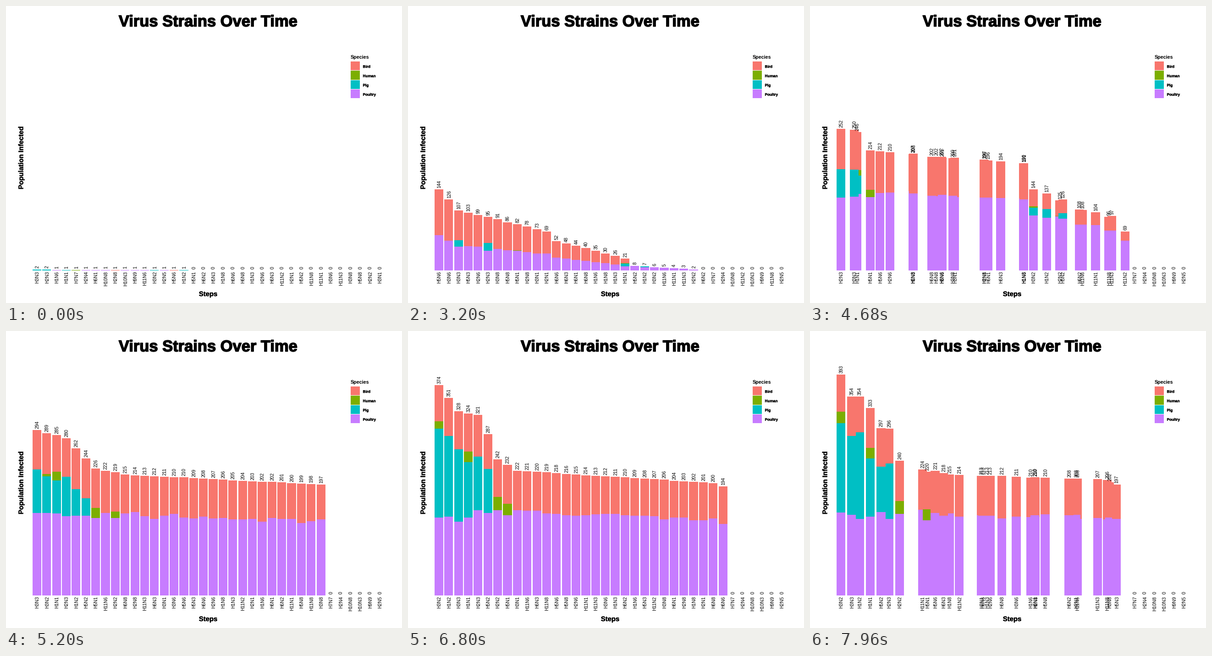
A matplotlib script for the animation above (8 s loop, 864 by 648 pixels).

```python
import numpy as np
import matplotlib.pyplot as plt
from matplotlib import patheffects
from matplotlib.animation import FuncAnimation
from matplotlib.collections import PolyCollection

W, H, DPI = 864, 648, 72
BASE, UNIT = 577, 1.2265            # baseline and pixels per infection
X0, PITCH, BAR = 67.4, 21.37, 19.2
STEPS, PER_STEP, HOLD = 20, 10, 5   # frames per step, frames held still

POULTRY, PIG, HUMAN, BIRD = range(4)
COLORS = ["#C77CFF", "#00BFC4", "#7CAE00", "#F8766D"]

# Listed in the order that settles ties.
STRAINS = (
    "H5N1 H1N6 H6N2 H5N3 H1N8 H1N1 H3N3 H2N3 H7N7 H2N4 H6N1 H10N8 "
    "H6N6 H2N8 H6N8 H1N3 H2N6 H6N3 H11N2 H10N3 H2N1 H9N9 H11N6 H3N2 "
    "H5N2 H11N8 H2N5 H11N1 H3N6 H11N3 H5N6 H3N8 H5N8 H1N2 H2N2 H3N1"
).split()
N = len(STRAINS)
ROW = {s: i for i, s in enumerate(STRAINS)}
rng = np.random.default_rng(5)

totals = np.zeros((STEPS + 1, N))
slots = np.zeros((STEPS + 1, N))
ranked_steps = []


def ranking(step, names, profile):
    """Rank the strains; totals follow a line through {rank: total}."""
    order = [ROW[s] for s in names.split()]
    ranks = np.arange(len(order))
    totals[step, order] = np.round(
        np.interp(ranks, list(profile), list(profile.values())))
    order += [i for i in range(N) if i not in order]
    slots[step, order] = np.arange(N)
    ranked_steps.append(step)


ranking(0, "H3N3 H2N3 H1N6 H1N1 H7N7 H2N4 H6N1 H10N8 H2N8 H10N3 H9N9 H11N6 "
           "H3N2 H2N5 H5N6 H1N2", {1: 2, 2: 1})
ranking(4, "H5N6 H2N3 H3N3 H1N6 H6N1 H2N8 H1N1 H2N6 H5N3 H11N6 H3N6 H1N2 "
           "H5N1 H6N6 H6N8 H1N3 H3N8 H3N1",
        {0: 35, 1: 8, 4: 4, 7: 3, 8: 2, 11: 2, 12: 1})
ranking(8, "H5N6 H3N6 H3N3 H5N3 H2N6 H2N3 H3N8 H5N8 H5N1 H2N8 H3N1 H2N1 H6N6 "
           "H6N3 H6N1 H6N8 H1N6 H1N8 H1N3 H1N1 H5N2 H1N2 H3N2 H11N6 H11N1 "
           "H11N3 H2N2",
        {0: 144, 2: 107, 5: 95, 11: 69, 12: 52, 15: 40, 19: 21, 20: 8, 26: 2})
ranking(10, "H2N3 H3N3 H5N6 H1N1 H2N6 H5N1 H5N3 H5N8 H3N8 H6N6 H2N8 H3N6 H3N1 "
            "H2N1 H6N1 H6N8 H1N6 H1N3 H6N3 H1N8 H2N2 H1N2 H3N2 H5N2 H6N2 "
            "H11N1 H11N6 H11N8 H11N3 H11N2",
        {0: 232, 2: 217, 9: 199, 19: 183, 20: 66, 23: 57, 28: 33, 29: 10})
ranking(13, "H3N3 H3N2 H1N1 H2N3 H1N2 H5N2 H5N1 H11N6 H2N2 H6N8 H2N8 H11N3 "
            "H6N3 H3N1 H3N6 H5N6 H5N3 H6N6 H2N6 H1N8 H1N3 H11N2 H2N1 H1N6 "
            "H6N1 H6N2 H11N1 H5N8 H11N8 H3N8",
        {0: 294, 3: 280, 4: 262, 6: 226, 9: 215, 29: 197})
ranking(17, "H3N2 H1N2 H3N3 H1N1 H2N3 H5N2 H2N2 H5N1 H3N1 H11N6 H6N3 H11N8 "
            "H5N6 H5N8 H2N6 H11N1 H11N3 H3N6 H1N3 H6N2 H1N6 H5N3 H11N2 H3N8 "
            "H6N1 H2N8 H1N8 H2N1 H6N8 H6N6",
        {0: 374, 2: 328, 4: 321, 5: 287, 6: 242, 8: 222, 28: 200, 29: 194})
ranking(19, "H3N2 H1N2 H3N3 H1N1 H2N3 H5N2 H2N2 H5N1 H2N6 H2N8 H5N8 H6N8 H1N8 "
            "H11N2 H1N3 H6N3 H11N6 H3N6 H6N1 H6N6 H5N3 H11N1 H3N8 H1N6 H2N1 "
            "H5N6 H6N2 H3N1 H11N3 H11N8",
        {0: 381, 1: 353, 3: 327, 5: 292, 6: 240, 7: 220, 29: 203})
ranking(20, "H3N2 H3N3 H1N2 H1N1 H5N2 H2N3 H2N2 H11N1 H5N6 H5N1 H6N3 H1N8 "
            "H11N2 H3N1 H6N6 H1N3 H2N6 H6N8 H3N6 H1N6 H6N1 H2N8 H5N8 H6N2 "
            "H2N1 H11N6 H11N3 H11N8 H3N8 H5N3",
        {0: 394, 1: 355, 2: 354, 3: 334, 4: 298, 5: 295, 6: 240, 7: 226,
         11: 215, 27: 206, 29: 196})

# Quadratic growth between rankings, with noise on the plateau.
for a, b in zip(ranked_steps, ranked_steps[1:]):
    lo, hi = np.sqrt(totals[[a, b]])
    for s in range(a + 1, b):
        v = (lo + (hi - lo) * (s - a) / (b - a)) ** 2
        if s > 10:
            v = np.where(v > 180, v * rng.normal(1, 0.014, N), v)
        totals[s] = np.round(v)
        slots[s, np.argsort(-totals[s], kind="stable")] = np.arange(N)

# Spread by species as logistic curves: cap, midpoint, width.
PIGS = dict(H3N3=(145, 12.7, 2), H2N3=(100, 11.3, 1.9), H1N1=(105, 12.6, 1.6),
            H3N2=(160, 13.3, 0.8), H1N2=(156, 14, 1.2), H5N2=(82, 13.5, 1.1))
HUMANS = dict(H1N1=(20, 11.3, 1.3), H5N1=(21, 10.8, 1.2),
              H2N2=(24, 13.1, 0.6), H3N2=(26, 16.7, 2.5))
FIRST_HOST = {"H3N3": PIG, "H2N3": PIG, "H1N1": PIG, "H3N2": PIG, "H1N2": PIG,
              "H7N7": HUMAN, "H2N8": BIRD, "H5N6": BIRD}
LATE = "H2N2 H1N2 H3N2 H5N2 H6N2 H11N1 H11N2 H11N3 H11N6 H11N8".split()


def logistic(step, cap, mid, width):
    return cap // (1 + np.exp((mid - step) / width))


def split(step, name):
    """Share one strain's total among the four species."""
    out = np.zeros(4)
    total = totals[step, ROW[name]]
    if step == 0:
        out[FIRST_HOST.get(name, POULTRY)] = total
        return out
    for kind, curves in (PIG, PIGS), (HUMAN, HUMANS):
        if name in curves:
            out[kind] = min(logistic(step, *curves[name]), total - out.sum())
    rest = total - out.sum()
    early = (1, 0.84, 0.67) if name in LATE else (0.43, 0.65, 0.67)
    share = np.interp(step, (8, 10, 13), early)
    if step < 8 and name not in LATE:
        share = np.interp(step, (4, 8), (0.3, share))
    out[POULTRY] = np.round(rest * min(1, share * rng.normal(1, 0.02)))
    out[BIRD] = rest - out[POULTRY]
    return out


counts = np.array([[split(s, n) for n in STRAINS] for s in range(STEPS + 1)])

plt.rcParams["font.family"] = "Liberation Sans"
fig = plt.figure(figsize=(W / DPI, H / DPI), dpi=DPI, facecolor="white")
ax = fig.add_axes([0, 0, 1, 1])
ax.set(xlim=(0, W), ylim=(H, 0))
ax.axis("off")


def label(x, y, text, size, stroke=0, **kw):
    t = ax.text(x, y, text, fontsize=size, weight="bold", **kw)
    if stroke:
        t.set_path_effects([patheffects.withStroke(linewidth=stroke,
                                                   foreground="black")])


def box(x, y0, y1, w):
    return [(x, y0), (x + w, y0), (x + w, y1), (x, y1)]


label(441, 44.5, "Virus Strains Over Time", 34.5, 1.7, ha="center")
label(441, 633, "Steps", 14.8, 0.4, ha="center")
label(40.5, 331.5, "Population Infected", 14.8, 0.4, rotation=90,
      ha="right", va="center")
label(752, 115, "Species", 10.8)
for k, name in enumerate(["Bird", "Human", "Pig", "Poultry"]):
    y = 121 + 20.3 * k
    ax.add_patch(plt.Rectangle((752, y), 20, 19.4, fc=COLORS[3 - k], lw=0,
                               antialiased=False))
    label(778.5, y + 14, name, 8.3, 0.3)

draw_order = [ROW[s] for s in sorted(STRAINS)]
bars = PolyCollection([], facecolors=COLORS * N, linewidths=0,
                      antialiaseds=False)
ax.add_collection(bars, autolim=False)
upright = dict(fontsize=10.2, rotation=90, ha="center")
ticks = [ax.text(0, 579, s, va="top", **upright) for s in STRAINS]
values = [ax.text(0, 0, "", va="bottom", **upright) for _ in STRAINS]


def update(frame):
    step, phase = divmod(frame, PER_STEP)
    t = max(0, phase - HOLD) / (PER_STEP - HOLD)
    e = 0.5 - 0.5 * np.cos(np.pi * t)
    c = counts[step] * (1 - e) + counts[step + 1] * e
    x = X0 + PITCH * (slots[step] * (1 - e) + slots[step + 1] * e)
    tops = BASE - UNIT * np.cumsum(c, axis=1)
    edges = np.column_stack([np.full(N, BASE), tops])
    bars.set_verts([box(x[i] - BAR / 2, edges[i, k], edges[i, k + 1], BAR)
                    for i in draw_order for k in range(4)])
    for i in range(N):
        ticks[i].set_x(x[i] + 1)
        values[i].set_position((x[i] + 1, tops[i, BIRD] - 3))
        values[i].set_text(str(int(round(c[i].sum()))))
    return [bars, *ticks, *values]


anim = FuncAnimation(fig, update, frames=STEPS * PER_STEP, interval=40,
                     repeat=True, repeat_delay=0, blit=False)
plt.show()
```
